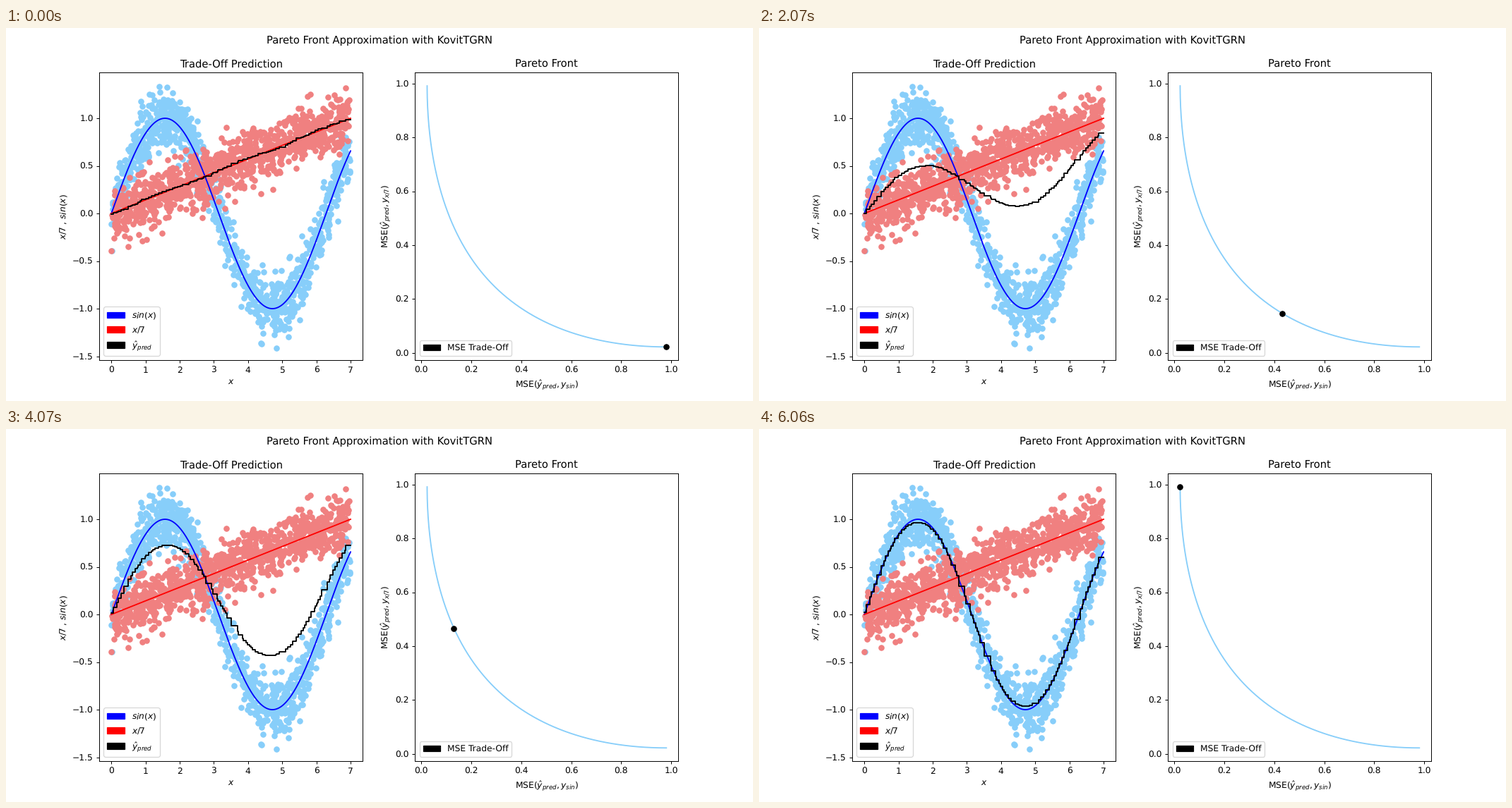
Write a matplotlib script that moves like this. It is 1058 px wide and 529 px high and loops after 6090 ms.

```python
import numpy as np
import matplotlib.pyplot as plt
from matplotlib.animation import FuncAnimation
from matplotlib.patches import Patch

STEP, FRAMES = 30, 203
BLUE, RED = "lightskyblue", "lightcoral"
# Key points of the trade-off weight, and spans in which it stands still
TIMES = [0, 1080, 2310, 2880, 3060, 4070, 6060]
WEIGHTS = [0, .167, .391, .478, .530, .668, 1]
HOLDS = [(0, 60), (2310, 2460), (2880, 3060), (3060, 3270)]

plt.rcParams["text.hinting"] = "no_hinting"
rng = np.random.default_rng(11)


def weight(t):
    for start, end in HOLDS:
        if start <= t < end:
            t = start
    return np.interp(t, TIMES, WEIGHTS)


def bulge(a):
    return .012 * (1 - (2 * a - 1) ** 4)


def front(a):
    """Errors against the sine and the line for weight a."""
    return .0235 + .957 * (1 - a) ** 2, .0225 + .969 * (a + bulge(a)) ** 2


def line(x):
    return x / 7


def scatter(ax, func, color, n=1000):
    x = rng.uniform(0, 7, n)
    noise = np.clip(rng.normal(0, .15, n), -.42, .42)
    ax.scatter(x, func(x) + noise, color=color)


# Step-like regressors for both targets
widths = rng.gamma(2, size=110)
edges = np.append(0, 7 * np.cumsum(widths) / widths.sum())
mid = (edges[:-1] + edges[1:]) / 2
drift = .012 * np.cos(2.6 * (mid - 3.7)) + rng.normal(0, .004, mid.size)
line_fit = np.maximum.accumulate(line(mid) + drift)
sine_fit = np.sin(mid) - .035 * np.sin(mid) ** 7


def predict(a):
    y = (1 - a) * line_fit + a * sine_fit
    return np.append(y, y[-1])


def legend(ax, **colors):
    ax.legend(handles=[Patch(color=c, label=label) for c, label in colors.items()],
              loc="lower left")


fig, (left, right) = plt.subplots(1, 2, figsize=(12, 6), dpi=1058 / 12)
fig.suptitle("Pareto Front Approximation with KovitTGRN")

scatter(left, np.sin, BLUE)
scatter(left, line, RED)
grid = np.linspace(0, 7, 500)
left.plot(grid, np.sin(grid), color="blue")
left.plot(grid, line(grid), color="red")
pred, = left.plot(edges, predict(0), color="black", drawstyle="steps-post")
left.set(title="Trade-Off Prediction", xlabel="$x$", ylabel="$x/7$ , $sin(x)$",
         xlim=(-.35, 7.35), ylim=(-1.539, 1.478))
legend(left, blue="$sin(x)$", red="$x/7$", black=r"$\hat{y}_{pred}$")

right.plot(*front(np.linspace(0, 1, 200)), color=BLUE)
dot = right.scatter(*front(0), color="black", zorder=3)
right.set(title="Pareto Front", xlabel=r"MSE($\hat{y}_{pred}, y_{sin}$)",
          ylabel=r"MSE($\hat{y}_{pred}, y_{x/7}$)",
          xlim=(-.0244, 1.0283), ylim=(-.026, 1.0402))
legend(right, black="MSE Trade-Off")


def update(i):
    a = weight(i * STEP)
    pred.set_ydata(predict(a + bulge(a) / 2))
    dot.set_offsets([front(a)])
    return pred, dot


anim = FuncAnimation(fig, update, frames=FRAMES, interval=STEP,
                     repeat=True, repeat_delay=0, blit=False)
plt.show()
```
